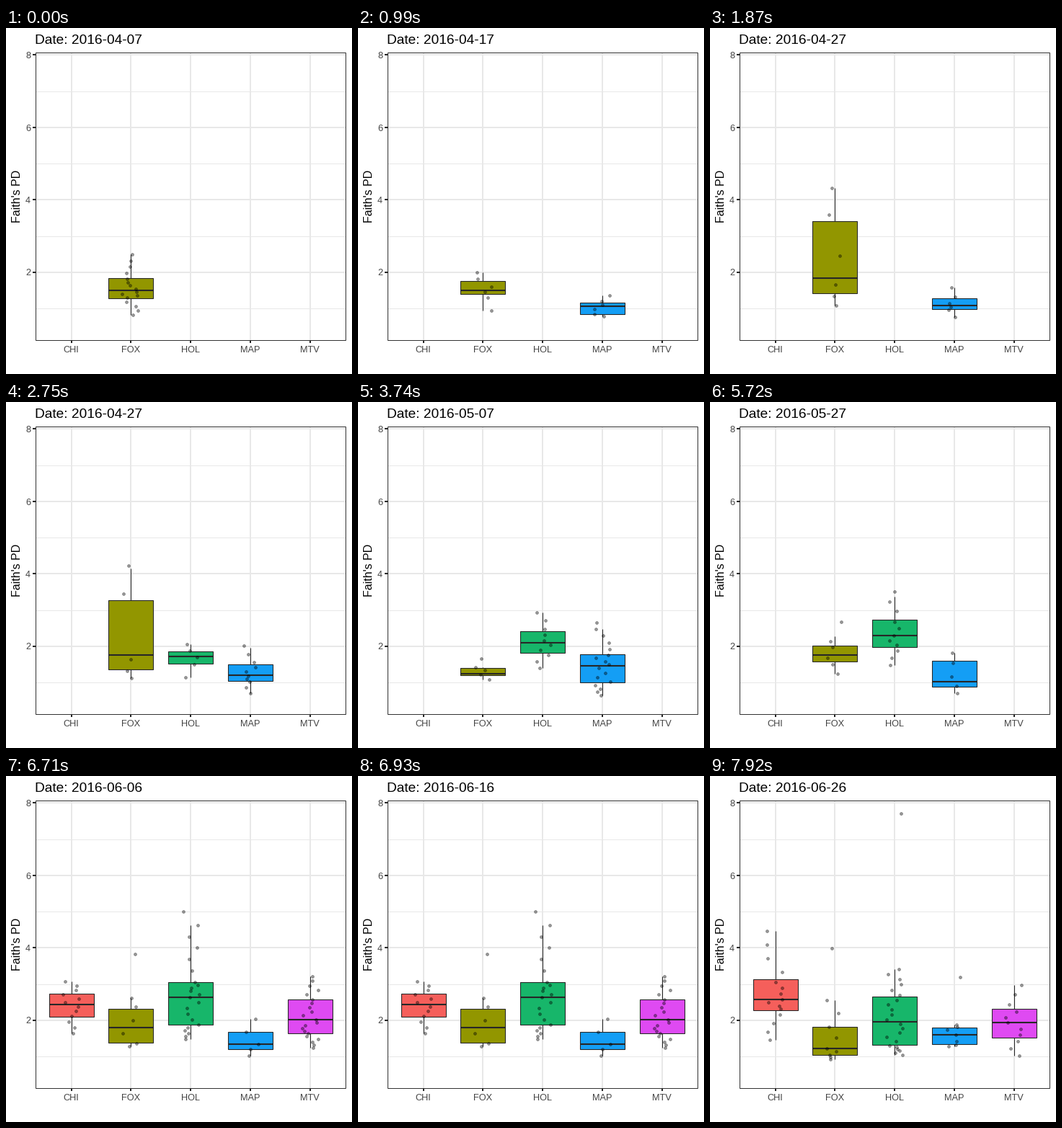
Recreate the animation shown at these times as a matplotlib script. Size 480 px wide and 480 px high, loop 8 s.

```python
import matplotlib.pyplot as plt
import numpy as np
from matplotlib.animation import FuncAnimation
from matplotlib.patches import Rectangle

SIZE, DPI = 480, 100
PX = 72 / DPI                      # points per pixel
LOOP, TICK, STEP, CYCLE = 8000, 20, 110, 990
LEFT, TOP, RIGHT, BOTTOM = 41, 34, 471, 433
INK, GREY, GRID = "#272727", "#424242", "#e8e8e8"
COLORS = dict(CHI="#f55f5b", FOX="#929600", HOL="#17b66a",
              MAP="#149ef5", MTV="#df4af2")
CENTERS = {site: 91 + 82.75 * i for i, site in enumerate(COLORS)}
BOX_W, JITTER = 62, 12
rng = np.random.default_rng(7)


def y_of(value):
    return 439.8 - 50.23 * value


def site_data(box, n, outliers=()):
    """Samples follow the box's quantiles, with random sideways jitter."""
    values = np.interp(np.linspace(0, 1, n), np.linspace(0, 1, 5), box)
    values = np.append(values, outliers)
    return box, np.column_stack([rng.uniform(-JITTER, JITTER, len(values)),
                                 values])


def snap(**sites):
    """Each site: sample count, min, q1, median, q3, max, then outliers."""
    return {s: site_data(np.array(row[1:6]), row[0], row[6:])
            for s, row in sites.items()}


def before(third, after):
    """State from which `third` lies one third of the way to `after`."""
    return {s: site_data((3 * box - after[s][0]) / 2, len(pts))
            for s, (box, pts) in third.items()}


def spread(pts, n):
    return pts[np.linspace(0, len(pts) - 1, n).round().astype(int)]


def mix(a, b, t):
    """Blend two states; only sites and samples present in both move."""
    out = {}
    for s in a.keys() & b.keys():
        (box_a, pts_a), (box_b, pts_b) = a[s], b[s]
        n = min(len(pts_a), len(pts_b))
        out[s] = (box_a + t * (box_b - box_a),
                  (1 - t) * spread(pts_a, n) + t * spread(pts_b, n))
    return out


april_start = snap(FOX=(16, 0.83, 1.28, 1.49, 1.84, 2.50))
april_mid = snap(FOX=(6, 0.95, 1.39, 1.50, 1.76, 2.00),
                 MAP=(6, 0.79, 0.85, 1.07, 1.17, 1.35))
april_third = snap(FOX=(6, 1.13, 1.35, 1.75, 3.28, 4.14),
                   HOL=(5, 1.15, 1.51, 1.72, 1.85, 2.06),
                   MAP=(10, 0.71, 1.04, 1.21, 1.49, 1.95))
may = snap(FOX=(4, 1.09, 1.20, 1.24, 1.39, 1.42, 1.65),
           HOL=(10, 1.39, 1.81, 2.09, 2.42, 2.94),
           MAP=(16, 0.64, 1.00, 1.45, 1.78, 2.47, 2.66))
may_third = snap(FOX=(6, 1.25, 1.57, 1.75, 2.01, 2.27),
                 HOL=(11, 1.48, 1.98, 2.29, 2.74, 3.38),
                 MAP=(8, 0.71, 0.89, 1.02, 1.60, 1.82))
june = snap(CHI=(12, 1.63, 2.09, 2.44, 2.74, 3.07),
            FOX=(6, 1.28, 1.38, 1.80, 2.31, 2.62, 3.83),
            HOL=(21, 1.47, 1.87, 2.64, 3.05, 4.63, 5.01),
            MAP=(5, 1.03, 1.20, 1.34, 1.67, 2.03),
            MTV=(21, 1.25, 1.63, 2.02, 2.58, 3.21))
june_end = snap(CHI=(15, 1.45, 2.27, 2.58, 3.14, 4.47),
                FOX=(9, 0.93, 1.04, 1.23, 1.82, 2.56, 3.99),
                HOL=(22, 1.05, 1.32, 1.96, 2.66, 3.42, 7.72),
                MAP=(7, 1.29, 1.33, 1.59, 1.80, 1.87, 3.19),
                MTV=(11, 1.03, 1.51, 1.93, 2.31, 2.97))

states = [april_start, april_mid, before(april_third, may), may, may,
          before(may_third, june), june, june, june_end]
dates = np.datetime64("2016-04-07") + 10 * np.arange(len(states))

plt.rcParams["font.family"] = "Liberation Sans"
fig = plt.figure(figsize=(SIZE / DPI, SIZE / DPI), dpi=DPI, facecolor="white")
ax = fig.add_axes([0, 0, 1, 1])
ax.set_xlim(0.5, SIZE + 0.5)
ax.set_ylim(SIZE + 0.5, 0.5)
ax.axis("off")


def line(xs, ys, color, width, z):
    return ax.plot(xs, ys, color=color, lw=width * PX, zorder=z,
                   solid_capstyle="butt")[0]


def label(x, y, text, size, color="black", **kw):
    return ax.text(x, y, text, fontsize=size * PX, color=color,
                   va="baseline", **kw)


for v in (1, 3, 5, 7):
    line([LEFT, RIGHT], [y_of(v)] * 2, GRID, 1, 0)
for v in (2, 4, 6, 8):
    y = y_of(v)
    line([LEFT, RIGHT], [y, y], GRID, 2, 1)
    line([LEFT - 4, LEFT], [y, y], INK, 2, 1)
    label(34.5, y + 4.6, str(v), 12.8, GREY, ha="right")
for site, x in CENTERS.items():
    line([x, x], [TOP, BOTTOM], GRID, 2, 1)
    line([x, x], [BOTTOM, BOTTOM + 4], INK, 2, 1)
    label(x, 451, site, 12.8, GREY, ha="center")
ax.add_patch(Rectangle((LEFT, TOP), RIGHT - LEFT, BOTTOM - TOP, fill=False,
                       ec="#333333", lw=PX, zorder=8))
label(20.5, 233.5, "Faith's PD", 16, ha="center", rotation=90,
      rotation_mode="anchor")
title = label(41, 22, "", 19.2, ha="left")

parts = {}
for site, x in CENTERS.items():
    left = x - BOX_W / 2
    whisker = line([x, x], [0, 0], INK, 1.07, 3)
    body = ax.add_patch(Rectangle((left, 0), BOX_W, 0, fc=COLORS[site],
                                  ec=INK, lw=1.07 * PX, zorder=4))
    median = line([left, left + BOX_W], [0, 0], INK, 2.1, 5)
    parts[site] = whisker, body, median
dots = ax.scatter([], [], s=(3.9 * PX) ** 2, fc=(0, 0, 0, 0.4),
                  ec=(0, 0, 0, 0.4), lw=0.7 * PX, zorder=6)


def update(k):
    i, t = divmod(k * TICK + TICK // 2, CYCLE)
    frac = max(0, t // STEP - 6) / 3
    view = mix(states[i], states[i + 1], frac) if frac else states[i]
    title.set_text(f"Date: {dates[i + (frac > 0.5)]}")
    spots = []
    for site, artists in parts.items():
        for artist in artists:
            artist.set_visible(site in view)
        if site in view:
            box, pts = view[site]
            low, q1, mid, q3, high = y_of(box)
            whisker, body, median = artists
            whisker.set_ydata([high, low])
            body.set_y(q3)
            body.set_height(q1 - q3)
            median.set_ydata([mid, mid])
            spots.append(np.column_stack([CENTERS[site] + pts[:, 0],
                                          y_of(pts[:, 1])]))
    dots.set_offsets(np.vstack(spots))
    return []


anim = FuncAnimation(fig, update, frames=LOOP // TICK, interval=TICK,
                     repeat=True, repeat_delay=0)
plt.show()
```
